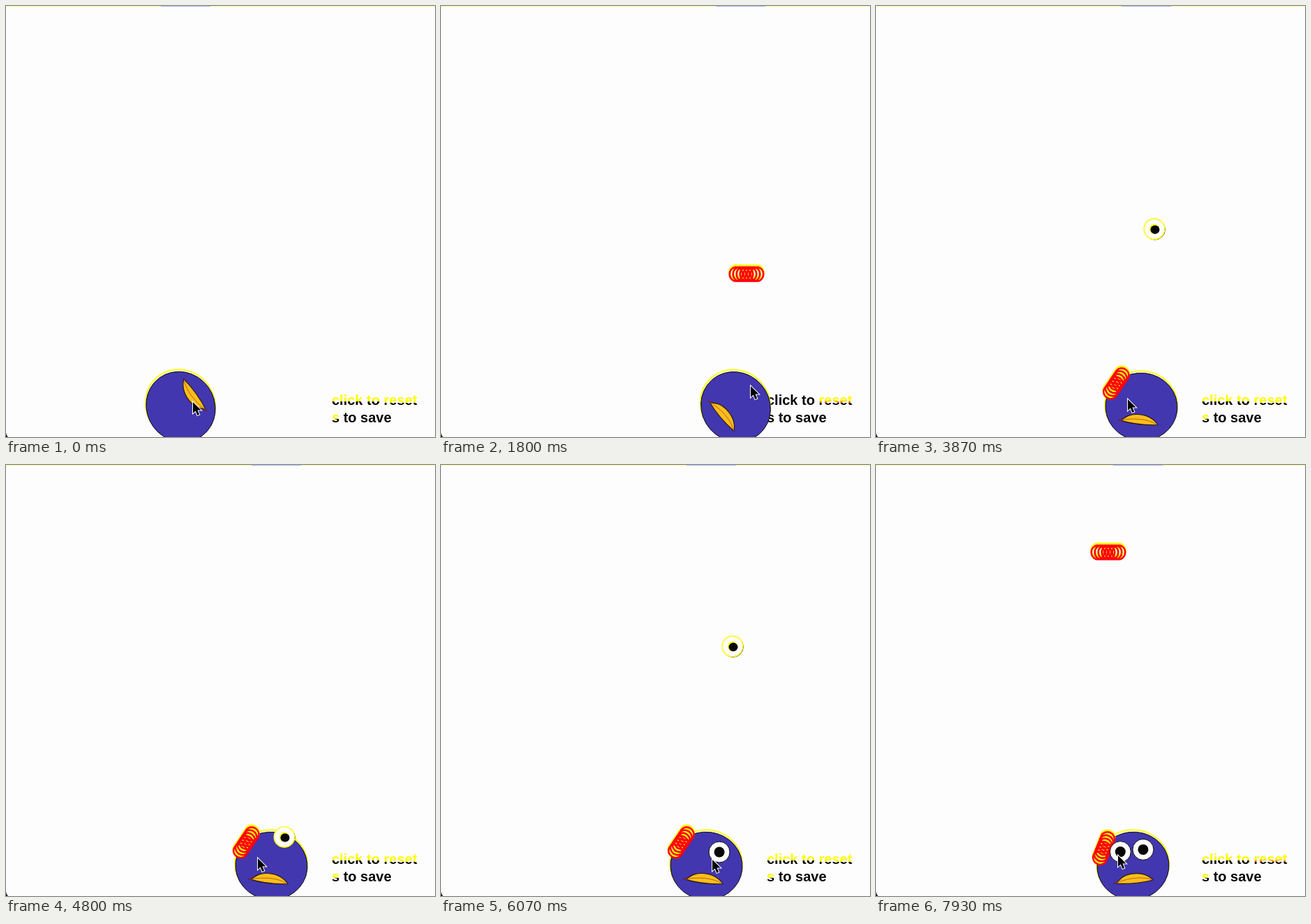
An HTML page with a canvas for the animation above (8 s loop, 615 by 618 pixels).

```html
<!DOCTYPE html>
<html lang="en">
<head>
<meta charset="utf-8">
<title>Rolling head</title>
<style>
  html, body { margin: 0; width: 100%; height: 100%; overflow: hidden; background: #fdfdfd; }
  canvas { display: block; width: 615px; height: 618px; }
</style>
</head>
<body>
<canvas id="stage" width="615" height="618"></canvas>
<script>
const ctx = document.getElementById('stage').getContext('2d');
const LOOP = 8000, STEP = 1000 / 15, HEAD_Y = 572;
const YELLOW = '#ffff00', RED = '#ff0010', INK = '#080808', PAPER = '#fdfdfd';

// time, head x, pointer x, pointer y
const poses = [
  [0, 250, 268, 568], [1500, 422, 444, 545], [1800, 422, 444, 545],
  [2435, 435, 456, 552], [2930, 404, 380, 559], [3400, 380, 361, 564],
  [4800, 380, 361, 564], [6070, 380, 389, 566], [7030, 416, 438, 569],
  [7400, 416, 438, 569], [7930, 368, 347, 560], [8000, 366, 345, 560]
];

// Each part falls at constant speed, then sticks to the head at `at`.
const parts = [
  { draw: hair, red: true, x: 438, start: 70, end: 2435, from: 0, to: 525, at: [-38.8, -27.2], turn: -62 },
  { draw: eye, x: 399, start: 2470, end: 4890, from: 0, to: 554, at: [17.1, -18.9], turn: 0 },
  { draw: eye, x: 418, start: 4900, end: 7400, from: 9, to: 547, at: [-15.7, -19.2], turn: 0 },
  { draw: hair, red: true, x: 333, start: 7400, end: 9700, from: 0, to: 538, at: [0, 0], turn: 0 }
];

const mouth = new Path2D('M-28 25C-22 24-20 15-4 14C12 13 22 20 27 26C12 28-8 29-28 25Z');
const crease = new Path2D('M-27 25C-12 20 12 18 26 26');
const arrow = new Path2D('M0 0V16L3.7 12.6L6.4 19L9.2 17.8L6.5 11.6H11.6Z');

const radians = deg => deg * Math.PI / 180;

function poseAt(t) {
  const i = Math.max(1, poses.findIndex(p => p[0] > t));
  const a = poses[i - 1], b = poses[i];
  const u = (t - a[0]) / (b[0] - a[0]), s = u * u * (3 - 2 * u);
  return a.map((v, k) => v + (b[k] - v) * s);
}

function ellipse(x, y, rx, ry, fill, stroke, width = 1, angle = 0) {
  ctx.beginPath();
  ctx.ellipse(x, y, rx, ry, angle, 0, 2 * Math.PI);
  if (fill) { ctx.fillStyle = fill; ctx.fill(); }
  if (stroke) { ctx.strokeStyle = stroke; ctx.lineWidth = width; ctx.stroke(); }
}

function place(x, y, angle, draw) {
  ctx.save();
  ctx.translate(x, y);
  ctx.rotate(angle);
  draw();
  ctx.restore();
}

function hair(x, y, angle) {
  const coil = (dy, color, width) => place(x, y + dy, angle, () => {
    for (let i = -3; i <= 3; i++) ellipse(i * 5, 0, 9.3, 10, null, color, width);
  });
  coil(-2, YELLOW, 3);
  coil(0.5, RED, 2.6);
}

function eye(x, y, angle, falling) {
  if (falling) {
    ellipse(x + 0.7, y + 0.7, 14.6, 14.6, PAPER, INK);
    ellipse(x, y, 14.8, 14.8, PAPER, YELLOW, 1.4);
    ellipse(x, y, 7, 7, YELLOW);
    ellipse(x + 1, y + 1, 6.5, 6.2, INK);
  } else {
    ellipse(x, y, 15, 15, PAPER, INK);
    ellipse(x, y, 7.5, 7.5, INK);
  }
}

function head(x, angle) {
  ellipse(x, HEAD_Y, 52, 49, '#ffffc8', YELLOW, 1.6, angle);
  ellipse(x + 0.5, HEAD_Y + 2.8, 51.6, 48.6, '#4237ae', INK, 1, angle);
  place(x, HEAD_Y, angle, () => {
    ctx.fillStyle = '#ffbd1c';
    ctx.fill(mouth);
    ctx.strokeStyle = '#24140a';
    ctx.lineWidth = 1.1;
    ctx.stroke(mouth);
    ctx.strokeStyle = '#a8641c';
    ctx.lineWidth = 0.9;
    ctx.stroke(crease);
    ellipse(-27, 24.8, 2.5, 1.3, '#7c2820');
  });
}

function split(y0, y1, y2, top) {
  const g = ctx.createLinearGradient(0, y0, 0, y2);
  const cut = (y1 - y0) / (y2 - y0);
  g.addColorStop(0, YELLOW);
  g.addColorStop(cut * 0.7, YELLOW);
  g.addColorStop(cut, top);
  g.addColorStop(cut, INK);
  return g;
}

function labels(headX, redFalling) {
  const write = (text, x, y, fill) => {
    ctx.fillStyle = fill;
    ctx.fillText(text, x, y);
    return x + ctx.measureText(text).width;
  };
  ctx.font = 'bold 20px "Liberation Sans", Arial, sans-serif';
  const edge = split(557, 567, 574, YELLOW);
  const x = write('click to ', 467, 572, headX > 418 ? INK : edge);
  write('reset', x, 572, split(557, 569, 574, redFalling ? '#ff3800' : YELLOW));
  const after = write('s', 467, 597, headX < 400 ? split(584, 592, 598, YELLOW) : INK);
  write(' to save', after, 597, INK);
}

function frame(t) {
  const [, headX, px, py] = poseAt(t);
  const angle = radians((headX - 374) * 1.02);
  const falling = parts.find(p => t >= p.start && t < p.end);

  ctx.fillStyle = PAPER;
  ctx.fillRect(0, 0, 615, 618);
  ctx.fillStyle = '#ffff9c';
  ctx.fillRect(0, 0, 615, 1);
  ctx.fillStyle = '#a9b9ee';
  ctx.fillRect(headX - 28, 0, 71, 1);
  ctx.fillStyle = INK;
  ctx.beginPath();
  ctx.moveTo(0, 612);
  ctx.quadraticCurveTo(0.5, 616, 3, 618);
  ctx.lineTo(0, 618);
  ctx.fill();

  labels(headX, falling && falling.red);
  head(headX, angle);
  const c = Math.cos(angle), s = Math.sin(angle);
  for (const p of parts) {
    if (t < p.end) continue;
    const [x, y] = p.at;
    p.draw(headX + x * c - y * s, HEAD_Y + x * s + y * c, angle + radians(p.turn), false);
  }
  if (falling) {
    const u = (t - falling.start) / (falling.end - falling.start);
    falling.draw(falling.x, falling.from + (falling.to - falling.from) * u, 0, true);
  }
  place(px, py, 0, () => {
    ctx.strokeStyle = '#fff';
    ctx.lineWidth = 2;
    ctx.stroke(arrow);
    ctx.fillStyle = '#000';
    ctx.fill(arrow);
  });
}

const began = performance.now();
function tick() {
  const t = (performance.now() - began) % LOOP;
  frame(Math.floor((t + 5) / STEP) % 120 * STEP);
  requestAnimationFrame(tick);
}
tick();
</script>
</body>
</html>
```
